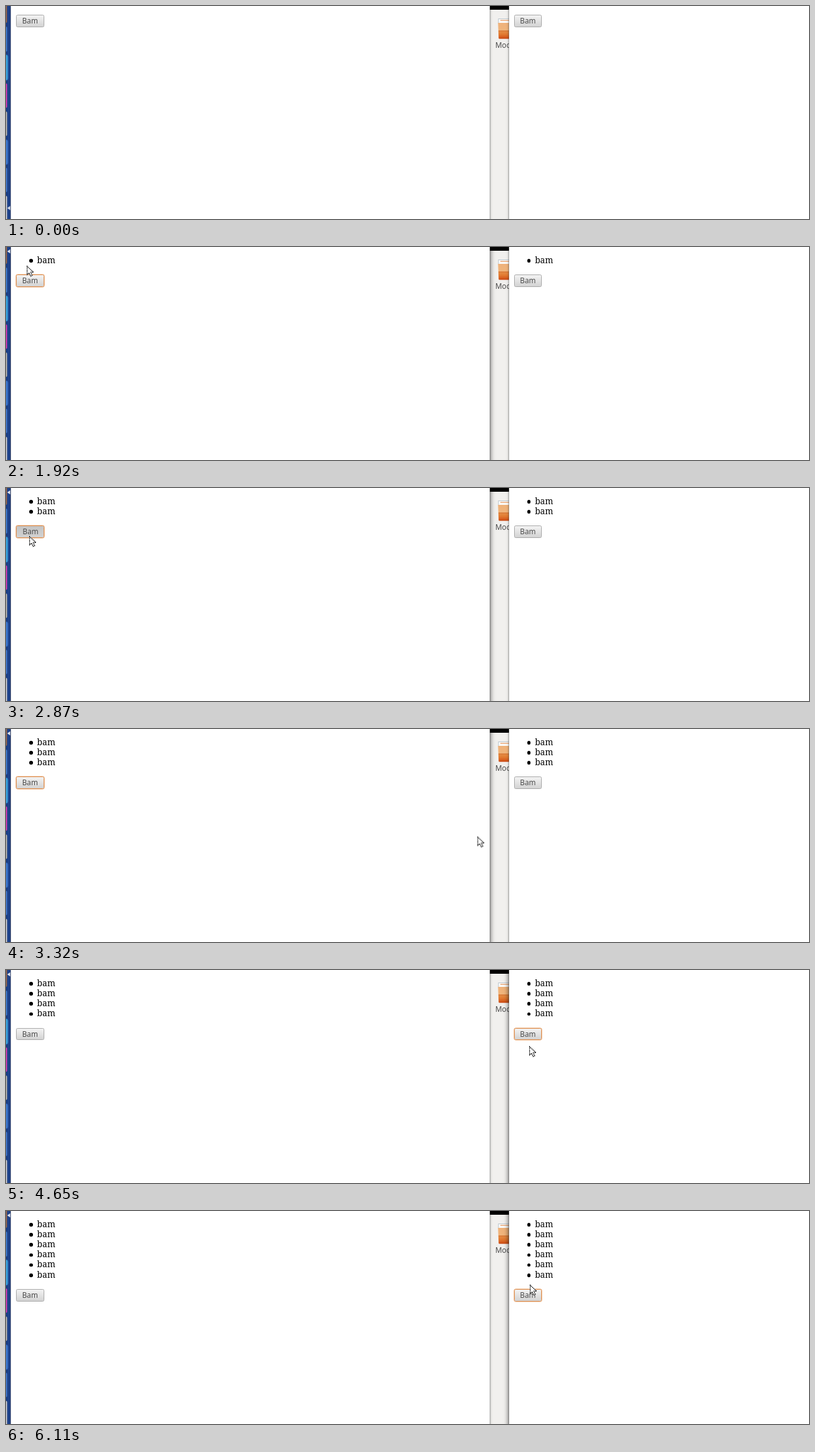
An HTML page that plays this animation: 1280x341 px, repeating every 6750 ms.

```html
<!DOCTYPE html>
<html lang="en">
<head>
<meta charset="utf-8">
<title>Two synced lists</title>
<style>
  :root { --loop: 6750ms; }
  html, body { margin: 0; width: 100%; height: 100%; overflow: hidden; }
  body { position: relative; background: #f1f0ee; }
  body > * { position: absolute; }

  /* Windows */
  .pane {
    top: -20px; bottom: -20px; box-sizing: border-box; padding: 34px 0 0 7.6px;
    background: #fff; box-shadow: 0 0 0 .6px #8889, 0 0 4px #0008;
    animation: var(--loop) step-end infinite;
  }
  .left { left: 8.4px; width: 762.6px; animation-name: left-shadow; }
  .right { left: 802px; width: 500px; animation-name: right-shadow; }

  .list {
    position: relative; top: -1.4px; height: 0; overflow: hidden;
    clip-path: inset(0 0 13.6px);
    font: 13.65px/16.2px "Noto Serif", serif; color: #000;
    animation: grow var(--loop) step-end infinite;
  }
  .list div { position: relative; height: 16.2px; padding-left: 33.6px; }
  .list div::before {
    content: ""; position: absolute; left: 21.2px; top: 6.4px;
    width: 5.6px; height: 5.6px; border-radius: 50%; background: #000;
  }
  .button {
    box-sizing: border-box; width: 44.6px; height: 19.6px;
    border: 1px solid #a8a8a8; border-radius: 2.5px;
    background: linear-gradient(#f3f3f3, #d3d3d3);
    font: 11.7px/16.5px "Noto Sans", sans-serif; color: #4c4c4c; text-align: center;
    animation: var(--loop) step-end infinite;
  }
  .left .button { animation-name: left-focus, left-press; }
  .right .button { animation-name: right-focus, right-press; }

  @keyframes grow {
    0% { height: 0; }
    24.444% { height: 30px; }
    33.63% { height: 46.2px; }
    44% { height: 62.4px; }
    65.481% { height: 78.6px; }
    77.481% { height: 94.8px; }
    90.074%, 100% { height: 111px; }
  }
  @keyframes left-shadow {
    23.259% { box-shadow: 0 0 0 .6px #666a, 0 0 8px #000c; }
    64.296% { box-shadow: 0 0 0 .6px #8889, 0 0 4px #0008; }
  }
  @keyframes right-shadow {
    64.296%, 100% { box-shadow: 0 0 0 .6px #666a, 0 0 8px #000c; }
  }
  @keyframes left-focus {
    23.259% { border-color: #dc8b4b; box-shadow: 0 0 0 .5px #e9a66f; }
    64.296% { border-color: #a8a8a8; box-shadow: none; }
  }
  @keyframes right-focus {
    64.296%, 100% { border-color: #dc8b4b; box-shadow: 0 0 0 .5px #e9a66f; }
  }
  @keyframes left-press {
    23.259%, 32.444%, 42.519% { background: linear-gradient(#c4c4c4, #d2d2d2); text-indent: 1.7px; }
    24.444%, 33.63%, 44% { background: linear-gradient(#f3f3f3, #d3d3d3); text-indent: 0; }
  }
  @keyframes right-press {
    64.296%, 75.407%, 88.889% { background: linear-gradient(#c4c4c4, #d2d2d2); text-indent: 1.7px; }
    65.481%, 77.481%, 90.074% { background: linear-gradient(#f3f3f3, #d3d3d3); text-indent: 0; }
  }

  /* Desktop */
  .launcher { left: 0; top: 0; }
  .marker { animation: marker var(--loop) step-end infinite; }
  @keyframes marker {
    0% { transform: translateY(323.5px); }
    23.259%, 100% { transform: translateY(7px); }
  }
  .folder { left: 771px; top: 0; }
  .folder text { font: 11.7px "Noto Sans", sans-serif; fill: #4c4c4c; }

  .cursor { left: 0; top: 0; overflow: visible; animation: move var(--loop) linear infinite; }
  @keyframes move {
    0% { transform: translate(494px, 400px); animation-timing-function: step-end; }
    8.889% { transform: translate(494px, 323px); }
    10.4% { transform: translate(400px, 246px); }
    11.9% { transform: translate(262px, 152px); }
    13.3% { transform: translate(132px, 74px); }
    14.8% { transform: translate(60px, 32px); }
    16.3% { transform: translate(28px, 20px); }
    18.074%, 28.2% { transform: translate(31px, 26px); }
    28.444% { transform: translate(33px, 30px); }
    31.3%, 33.63% { transform: translate(37px, 53px); }
    37.778%, 38.8% { transform: translate(37px, 72px); }
    38.963%, 44% { transform: translate(37px, 77px); }
    45.2% { transform: translate(110px, 118px); }
    46.7% { transform: translate(330px, 171px); }
    48.1% { transform: translate(590px, 184px); }
    49.6% { transform: translate(810px, 168px); }
    50.9% { transform: translate(929px, 144px); }
    52.148% { transform: translate(909px, 123px); }
    54.2% { transform: translate(856px, 98px); }
    56.444%, 65.481% { transform: translate(838px, 84px); }
    68.889%, 70.7% { transform: translate(834px, 122px); }
    72.148%, 77.481% { transform: translate(835px, 104px); }
    80.741%, 83.4% { transform: translate(834px, 123px); }
    85.481%, 100% { transform: translate(835px, 118px); }
  }
</style>
</head>
<body>
  <svg class="folder" width="31" height="341">
    <defs>
      <linearGradient id="amber" x2="0" y2="1">
        <stop offset="0" stop-color="#eeb27b"/>
        <stop offset=".45" stop-color="#f0b57c"/>
        <stop offset=".5" stop-color="#e58f47"/>
        <stop offset=".72" stop-color="#e27a31"/>
        <stop offset="1" stop-color="#cf4a12"/>
      </linearGradient>
    </defs>
    <rect width="31" height="6" fill="#000"/>
    <rect x="14" y="20.5" width="30" height="7" fill="#fbfbfa" stroke="#bcc6cd"/>
    <path d="M17 23h14" stroke="#e9a36d" stroke-width="1.4"/>
    <path d="M13.3 27H44V52.5H16Q14.5 52.5 14.3 51Z" fill="url(#amber)"/>
    <path d="M14 40H31M14.3 51.6H31" stroke="#b9420f" stroke-opacity=".45"/>
    <text x="9" y="67">Mod</text>
  </svg>

  <div class="pane left"><div class="list"></div><div class="button">Bam</div></div>
  <div class="pane right"><div class="list"></div><div class="button">Bam</div></div>

  <svg class="launcher" width="8" height="341">
    <defs>
      <linearGradient id="navy">
        <stop offset="0" stop-color="#173a80"/>
        <stop offset=".7" stop-color="#20458f"/>
        <stop offset="1" stop-color="#16306f"/>
      </linearGradient>
    </defs>
    <rect width="7.4" height="341" fill="url(#navy)"/>
    <g>
      <rect x="-4" y="-8" width="5.6" height="35" rx="2" fill="#9c6a4c"/>
      <rect x="-4" y="33" width="6" height="40" rx="2" fill="#3c74c4"/>
      <rect x="-4" y="78" width="7" height="41" rx="3" fill="#3b9fd9" stroke="#2676bd"/>
      <rect x="-4" y="124" width="5.8" height="39" rx="2" fill="#cf3db4"/>
      <rect x="-4" y="169" width="5.8" height="39" rx="2" fill="#b3b1ac"/>
      <rect x="-4" y="214" width="7" height="40" rx="3" fill="#3d76cb" stroke="#2a5db4"/>
      <rect x="-4" y="259" width="6" height="39" rx="2" fill="#3f72c4"/>
      <rect x="-4" y="304" width="5.8" height="41" rx="2" fill="#c2c4c8"/>
    </g>
    <path class="marker" d="M2 0 6.6 -3.2V3.2Z" fill="#e4e8f0"/>
  </svg>

  <svg class="cursor" width="12" height="18">
    <path d="M.6 .8V14.2L3.9 11.3 6.2 16.6 8.7 15.5 6.5 10.4H10.8Z"
      fill="#fff" stroke="#fff" stroke-width="1.4"/>
    <path d="M.6 .8V14.2L3.9 11.3 6.2 16.6 8.7 15.5 6.5 10.4H10.8Z"
      fill="none" stroke="#000" stroke-width="1.25" stroke-dasharray="1.7 .9"/>
  </svg>

  <script>
    for (const list of document.querySelectorAll(".list"))
      list.innerHTML = "<div>bam</div>".repeat(6);
  </script>
</body>
</html>
```
